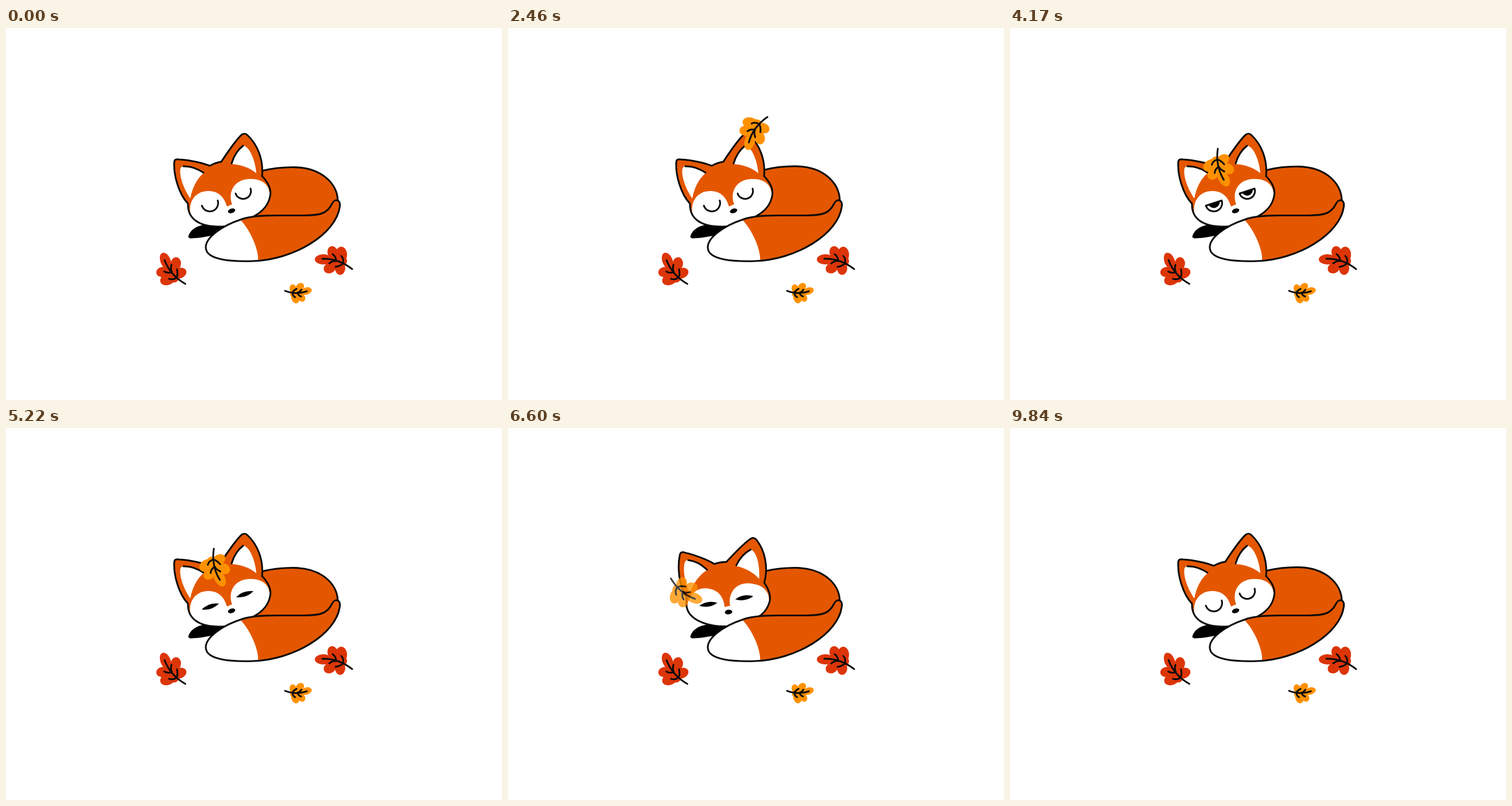
An HTML page that plays this animation: 864x648 px, repeating every 9990 ms.

```html
<!DOCTYPE html>
<html lang="en">
<head>
<meta charset="utf-8">
<title>Sleepy fox</title>
<style>
html, body { margin: 0; width: 100%; height: 100%; overflow: hidden; background: #fff; }
svg { display: block; width: 100vw; height: 100vh; }
.line { fill: none; stroke: #0b0b0b; stroke-width: 3; stroke-linecap: round; stroke-linejoin: round; }
.vein { vector-effect: non-scaling-stroke; }
.fur { fill: #e45700; }
.white { fill: #fff; }
.black { fill: #000; }
.red { fill: #dc3508; }
.gold { fill: #ff9100; }
</style>
</head>
<body>
<svg viewBox="0 0 864 648">
  <defs>
    <g id="leaf">
      <ellipse cx="-14" cy="-2" rx="15" ry="9"/>
      <ellipse cx="2" cy="-14" rx="9" ry="11" transform="rotate(-15 2 -14)"/>
      <ellipse cx="17" cy="-10" rx="10" ry="14"/>
      <ellipse cx="-3" cy="13" rx="11" ry="9" transform="rotate(-25 -3 13)"/>
      <ellipse cx="15" cy="13" rx="9" ry="12"/>
      <ellipse cx="9" cy="1" rx="18" ry="12"/>
      <path class="line vein" d="M-16-3Q12-4 36 15M2-11Q8-7 8 1M17-8Q22-3 20 5M-4 5Q3 0 8 1M7 11Q15 10 20 5"/>
    </g>
    <path id="skull" d="M317 306C300 288 292 255 293 235C293 229 296 228 302 229C320 230 342 235 355 240C362 236 368 234 375 233C385 218 400 195 411 185.500C414 183.500 418 183.500 421 187C437 202 449 228 446 258C456 268 462 280 460.500 290C458 310 445 321 430 329C405 342 390 346 372 346C340 346 316 335 317 306Z"/>
    <path id="slit" d="M-16 0Q0-8 16 0Q0 8-16 0Z"/>
    <clipPath id="clipL"><path/></clipPath>
    <clipPath id="clipR"><path/></clipPath>
  </defs>

  <path class="black" d="M318 362C322 350 335 342 355 342L392 343L376 359C360 361 340 366 322 366.500C318 366 317 364 318 362Z"/>

  <g id="body">
    <path class="fur" d="M400 262C447 249 475 243 500 243C550 243 577 272 578 301L566 328H400Z"/>
    <path class="line" d="M447 249.500C465 245 482 243.500 500 243.500C550 243.500 577 272 578 301"/>
  </g>

  <g id="head">
    <use href="#skull" class="fur"/>
    <path class="white" d="M304 244C301 258 310 281 321 297C325 276 334 261 345 252C333 246 318 239 307 241Z"/>
    <path class="white" d="M414 205C426 208 435 235 436 253C425 243 408 238 393 237C396 222 405 210 414 205Z"/>
    <path class="line" d="M309 241C322 240 335 246 344 252M393 236C397 222 404 212 413 205"/>
    <path class="white" d="M321 322C318 300 332 284 352 284C370 284 380 294 385 311L394 307C387 290 394 264 424 263C440 262 452 268 457 279L460 290C458 310 445 321 430 329C405 342 390 346 372 346C345 346 325 340 321 322Z"/>
    <use href="#skull" class="line"/>
    <ellipse class="black" cx="393" cy="318.500" rx="6.500" ry="4" transform="rotate(-17 393 318.500)"/>
    <g id="eyeL"><circle class="black" r="10.500" clip-path="url(#clipL)"/><path class="line"/></g>
    <g id="eyeR"><circle class="black" r="10" clip-path="url(#clipR)"/><path class="line"/></g>
    <g id="squint" class="black">
      <use href="#slit" transform="translate(356 311) rotate(-19)"/>
      <use href="#slit" transform="translate(416 289.500) rotate(-19)"/>
    </g>
  </g>

  <path class="fur" d="M408 334C420 329 440 326.500 470 326.500L520 327C550 327 560 322 568 306C572 297 583 298 581.500 311C575 360 500 404 439 406Z"/>
  <path class="white" d="M408 334C375 345 348 365 348 382C348 405 395 407 439 406C441 388 426 352 408 334Z"/>
  <path class="line" d="M408 334C375 345 348 365 348 382C348 405 395 407 430 406C500 404 575 360 581.500 311C583 298 572 297 568 306C560 322 550 326.500 520 326.500L470 326.500C440 326.500 420 329 408 334Z"/>

  <use href="#leaf" class="red" transform="translate(285 418) rotate(68) scale(1 -1)"/>
  <use href="#leaf" class="red" transform="translate(567 405)"/>
  <use href="#leaf" class="gold" transform="translate(513 460) rotate(162) scale(.69)"/>
  <use href="#leaf" class="gold" id="drift"/>
</svg>
<script>
const LOOP = 9990;
const $ = id => document.getElementById(id);
const part = (t, a, b) => Math.min(1, Math.max(0, (t - a) / (b - a)));
const ramp = (t, a, b) => (1 - Math.cos(Math.PI * part(t, a, b))) / 2;
const bump = (t, a, b) => Math.sin(Math.PI * part(t, a, b)) ** 2;
const mix = (a, b, e) => a + (b - a) * e;

const eyes = [["L", 355, 305, 14.5], ["R", 413, 284, 13.7]].map(([side, x, y, r]) => ({
  x, y, r,
  group: $("eye" + side),
  pupil: $("eye" + side).querySelector("circle"),
  rim: $("eye" + side).querySelector("path"),
  clip: $("clip" + side).firstElementChild
}));

// Lower half circle closed by a lid: k = -1 shut, 0 straight, 1 wide open.
const eyePath = (r, k) =>
  `M${-r} 0A${r} ${r} 0 0 0 ${r} 0A${r} ${Math.abs(k) * r} 0 0 ${k < 0 ? 1 : 0} ${-r} 0`;

const breath = t => 1 + 2 * bump(t, 0, 1100) + 2.4 * ramp(t, 1500, 3000)
  - 3.4 * ramp(t, 3900, 4590) + ramp(t, 7830, 8400) + 2.6 * bump(t, 8400, 9840);

// Three full head shakes
const shake = t => Math.sin(6 * Math.PI * part(t, 5430, 6690));

// Swings down to the ear, slips onto the head, is shaken off to the left.
function leafPose(t) {
  const q = part(t, 60, 2460), sink = q ** 3;
  const swing = (1 - q) * Math.cos(2 * Math.PI * (t - 1095) / 1500);
  const slip = .15 * ramp(t, 2580, 2880) + .85 * ramp(t, 3210, 3540);
  const s = shake(Math.min(t, 6270)), fall = part(t, 6270, 6780);
  return {
    x: mix(414 + 13 * sink + 80 * swing, 367, slip) - 13 * s - 85 * fall,
    y: mix(141 + 44 * sink, 249, slip) + 95 * fall ** 2,
    turn: mix(6 - 79 * sink - 45 * swing, -120, slip) + 27 * s - 60 * fall,
    alpha: part(t, 60, 300) - part(t, 6550, 6780)
  };
}

function draw(t) {
  $("body").setAttribute("transform", `translate(0 327) scale(1 ${1 + breath(t) / 84}) translate(0 -327)`);
  $("head").setAttribute("transform", `rotate(${-9.7 * shake(t)} 376 266)`);

  const tight = t >= 5220 && t < 6780;
  $("squint").style.display = tight ? "" : "none";
  const k = -1 + ramp(t, 3720, 4020) + (tight || t > 5220) - 2 * ramp(t, 8400, 8700);
  const sy = 1 - .8 * (ramp(t, 5010, 5220) - ramp(t, 6750, 6930));
  const up = ramp(t, 7500, 7560), gx = mix(.6, 1.5, up), gy = mix(-2, -4.8, up);
  for (const e of eyes) {
    const d = eyePath(e.r, k);
    e.group.style.display = tight ? "none" : "";
    e.group.setAttribute("transform", `translate(${e.x} ${e.y + 5 * (1 - sy)}) rotate(-18) scale(1 ${sy})`);
    e.rim.setAttribute("d", d);
    e.clip.setAttribute("d", d);
    e.clip.setAttribute("transform", `translate(${-gx} ${-gy})`);
    e.pupil.setAttribute("transform", `translate(${gx} ${gy})`);
    e.pupil.style.display = k > -.98 ? "" : "none";
  }

  const p = leafPose(t);
  $("drift").setAttribute("transform", `translate(${p.x} ${p.y}) rotate(${p.turn})`);
  $("drift").setAttribute("opacity", p.alpha);
}

function tick() {
  draw(performance.now() % LOOP);
  requestAnimationFrame(tick);
}
tick();
</script>
</body>
</html>
```
